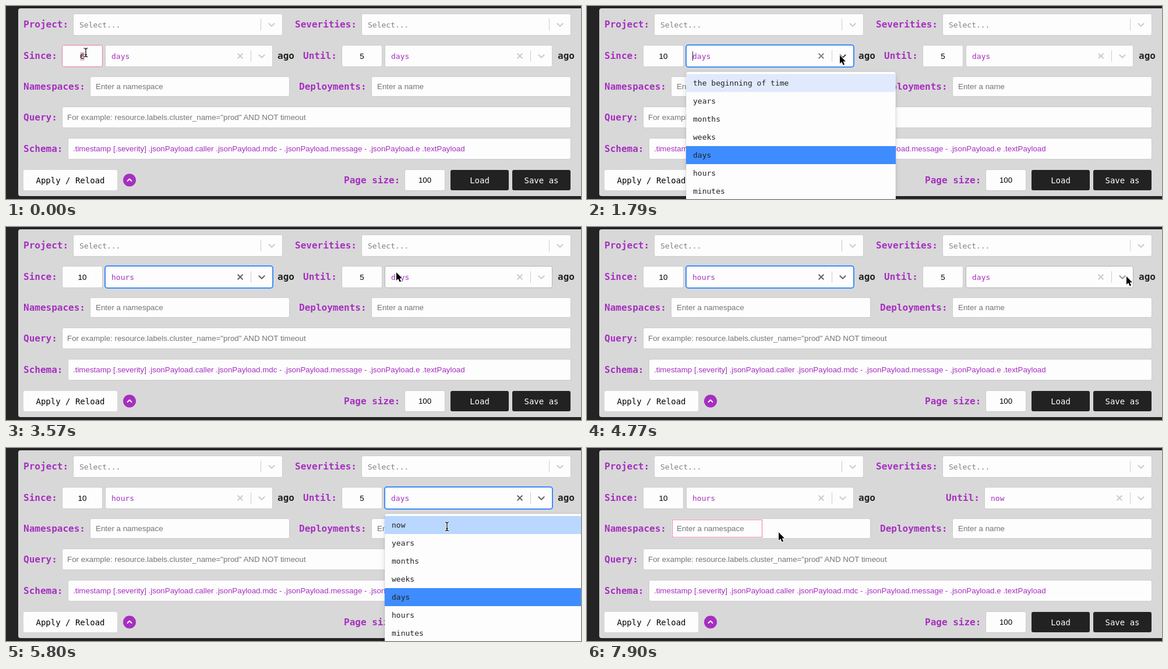
Write an HTML page that moves like this. It is 987 px wide and 332 px high and loops after 8000 ms.

```html
<!DOCTYPE html>
<html lang="en">
<head>
<meta charset="utf-8">
<title>Log filter form</title>
<style>
  html, body { margin: 0; width: 100%; height: 100%; overflow: hidden; background: #242424; }
  svg { display: block; width: 987px; height: 332px; }
  text { white-space: pre; }
  .label { font: bold 16px "DejaVu Sans Mono", monospace; }
  .value { font: 13px "DejaVu Sans Mono", monospace; }
  .button { font: 14px "DejaVu Sans Mono", monospace; text-anchor: middle; }
  .input { font: 13.333px "Liberation Sans", Arial, sans-serif; }
  .number { font: 13.333px "Liberation Sans", Arial, sans-serif; text-anchor: middle; }
</style>
</head>
<body>
<svg viewBox="0 0 987 332" xmlns="http://www.w3.org/2000/svg">
  <defs>
    <filter id="shadow" x="-10%" y="-10%" width="120%" height="120%">
      <feDropShadow dx="0" dy="4" stdDeviation="5" flood-opacity=".12"/>
    </filter>
  </defs>
  <g id="form"></g>
  <g id="live"></g>
</svg>
<script>
const LOOP = 8000, TICK = 148.85;
const PURPLE = '#a62fc0', DARK = '#222', WHITE = '#fdfdfd', BLUE = '#3f8cff', PINK = '#e87aad';
const EDGE = '#cccccc', HOVER = '#b3b3b3';
const UNITS = ['years', 'months', 'weeks', 'days', 'hours', 'minutes'];

// tick, x, y, text cursor
const PATH = [
  [0, 137, 80, 1], [7, 150, 82, 1], [8, 225, 88], [9, 335, 90], [10, 410, 87], [11, 434, 85],
  [15, 396, 135], [16, 320, 232], [17, 276, 289],
  [21, 288, 281], [22, 380, 215], [23, 530, 115], [24, 670, 78], [25, 828, 80], [26, 926, 85],
  [36, 920, 96], [37, 876, 114], [38, 806, 128], [39, 757, 135, 1],
  [44, 742, 138, 1], [45, 664, 145, 1], [46, 545, 151], [47, 434, 152], [48, 362, 149], [49, 329, 145]
];

const rect = (x, y, w, h, fill, more = '') =>
  `<rect x="${x}" y="${y}" width="${w}" height="${h}" fill="${fill}" ${more}/>`;
const text = (kind, x, y, s, fill) =>
  `<text class="${kind}" x="${x}" y="${y}" fill="${fill}">${s}</text>`;
const label = (x, y, s, fill = PURPLE) => text('label', x, y, s, fill);
const line = (d, color, width) =>
  `<path d="${d}" fill="none" stroke="${color}" stroke-width="${width}" stroke-linecap="round" stroke-linejoin="round"/>`;
const box = (x, y, w, h, edge = EDGE) =>
  rect(x + .5, y + .5, w - 1, h - 1, WHITE, `rx="3" stroke="${edge}"`);
const button = (x, w, s, fill, ink) =>
  rect(x, 282, w, 35, fill, 'rx="3"') + text('button', x + w / 2, 305, s, ink);
const caret = (x, y, h, color) => rect(x, y, 1, h, color);

function select(x, y, value, o = {}) {
  const w = o.w || 288, r = x + w, cy = y + 19;
  const idle = o.focus ? '#666' : '#ccc';
  const frame = o.focus
    ? rect(x, y, w, 38, WHITE, `rx="4" stroke="${BLUE}" stroke-width="2"`)
    : box(x, y, w, 38, o.hover ? HOVER : EDGE);
  const cx = r - 56, vx = r - 19;
  return frame +
    text('value', x + 11, y + 23.5, value, o.hint ? '#808080' : PURPLE) +
    (o.hint ? '' : line(`M${cx - 3.8} ${cy - 3.8}l7.6 7.6m0 -7.6l-7.6 7.6`, o.cross || idle, 2.1)) +
    rect(r - 38, y + 9, 1, 20, '#ccc') +
    line(`M${vx - 4.6} ${cy - 1.8}l4.6 4.5l4.6 -4.5`, o.arrow || idle, 2.1) +
    (o.caret ? caret(x + 11, y + 11, 16, DARK) : '');
}

function menu(x, first, row, tint) {
  const items = [first, ...UNITS].map((s, i) => {
    const y = 117 + i * 31;
    const fill = s === 'days' ? BLUE : i === row ? tint : '';
    return (fill ? rect(x, y, 360, 31, fill) : '') + text('value', x + 12, y + 20, s, DARK);
  });
  return rect(x, 113, 360, 260, WHITE, 'rx="4" stroke="#000" stroke-opacity=".1" filter="url(#shadow)"') + items.join('');
}

function pointer(x, y, beam) {
  if (beam) {
    const d = `M${x - 3} ${y - 7.5}q3 0 3 2.5v10q0 2.5 -3 2.5m6 -15q-3 0 -3 2.5m0 10q0 2.5 3 2.5M${x - 1.5} ${y + 3.5}h3`;
    return line(d, '#fff', 3) + line(d, '#000', 1.2);
  }
  return `<path d="M${x} ${y}v14l3.2 -3l2.5 5.6l2.4 -1l-2.4 -5.4h4.3z" fill="#000" stroke="#fff" stroke-width="2" stroke-linejoin="round" paint-order="stroke"/>`;
}

function form() {
  return rect(21, 4, 980, 323, '#d8d8d8', 'rx="4"') +
    label(30, 37, 'Project:') + select(115, 13, 'Select...', { w: 360, hint: true }) +
    label(496, 37, 'Severities:') + select(610, 13, 'Select...', { w: 360, hint: true }) +
    label(30, 91, 'Since:') + label(466, 91, 'ago', DARK) +
    label(30, 144, 'Namespaces:') + box(144, 121, 343, 35) +
    label(503, 144, 'Deployments:') + box(627, 121, 343, 35) +
    text('input', 637, 143, 'Enter a name', '#757575') +
    label(30, 197, 'Query:') + box(96, 173, 874, 37) +
    text('input', 105, 196, 'For example: resource.labels.cluster_name="prod" AND NOT timeout', '#757575') +
    label(30, 251, 'Schema:') + box(106, 227, 864, 37) +
    text('input', 115, 250, '.timestamp [.severity] .jsonPayload.caller .jsonPayload.mdc - .jsonPayload.message - .jsonPayload.e .textPayload', PURPLE) +
    button(30, 161, 'Apply / Reload', WHITE, '#000') +
    `<circle cx="212" cy="299.5" r="11" fill="${PURPLE}"/>` + line('M208.5 301l3.5 -3.5l3.5 3.5', '#fff', 1.8) +
    label(580, 305, 'Page size:') + box(684, 281, 70, 37) + text('number', 719, 304, '100', '#000') +
    button(763, 100, 'Load', DARK, '#fff') + button(869, 100, 'Save as', DARK, '#fff');
}

function live(n) {
  const within = (a, b) => n >= a && n < b;
  const [, x, y, beam] = PATH.filter(p => p[0] <= n).pop();
  const row = Math.max(0, Math.floor((y - 117) / 31));
  const sinceOpen = within(12, 19), untilOpen = within(33, 40);
  const now = n >= 40, typing = n >= 50;

  let s = box(96, 67, 70, 38, n < 12 ? PINK : EDGE);
  if (n < 3) s += rect(127, 79, 8, 15, '#ecc3d6');
  s += text('number', 131, 91, n < 3 ? '6' : n < 4 ? '1' : '10', '#000');

  s += select(170, 67, n < 19 ? 'days' : 'hours', {
    focus: within(12, 33), hover: within(8, 12), caret: within(12, 15),
    cross: n === 12 ? '#858585' : '',
    arrow: n === 11 ? '#999' : within(12, 15) ? '#444' : ''
  });

  s += label(now ? 616 : 510, 91, 'Until:');
  if (!now) s += box(576, 67, 70, 38) + text('number', 611, 91, '5', '#000') + label(947, 91, 'ago', DARK);
  s += select(now ? 682 : 650, 67, now ? 'now' : 'days', {
    focus: within(33, 50), hover: within(24, 33), caret: within(33, 36),
    cross: n === 33 ? '#858585' : '',
    arrow: within(26, 33) ? '#999' : within(33, 36) ? '#444' : ''
  });

  if (typing) s += rect(146.5, 123.5, 154, 30, WHITE, `stroke="${PINK}"`);
  s += text('input', 154, 143, 'Enter a namespace', '#757575');
  if (within(50, 53)) s += caret(154, 131, 16, DARK);

  if (sinceOpen) s += menu(170, 'the beginning of time', row, '#e1eafd');
  if (untilOpen) s += menu(650, 'now', row, n === 39 ? '#b9d7ff' : '#e1eafd');
  return s + pointer(x, y, beam);
}

const layer = document.getElementById('live');
let shown = -1;

function update(ms) {
  const n = Math.floor((ms % LOOP + 6) / TICK);
  if (n !== shown) layer.innerHTML = live(shown = n);
}

document.getElementById('form').innerHTML = form();
const start = performance.now();
function frame() {
  update(performance.now() - start);
  requestAnimationFrame(frame);
}
frame();
</script>
</body>
</html>
```
